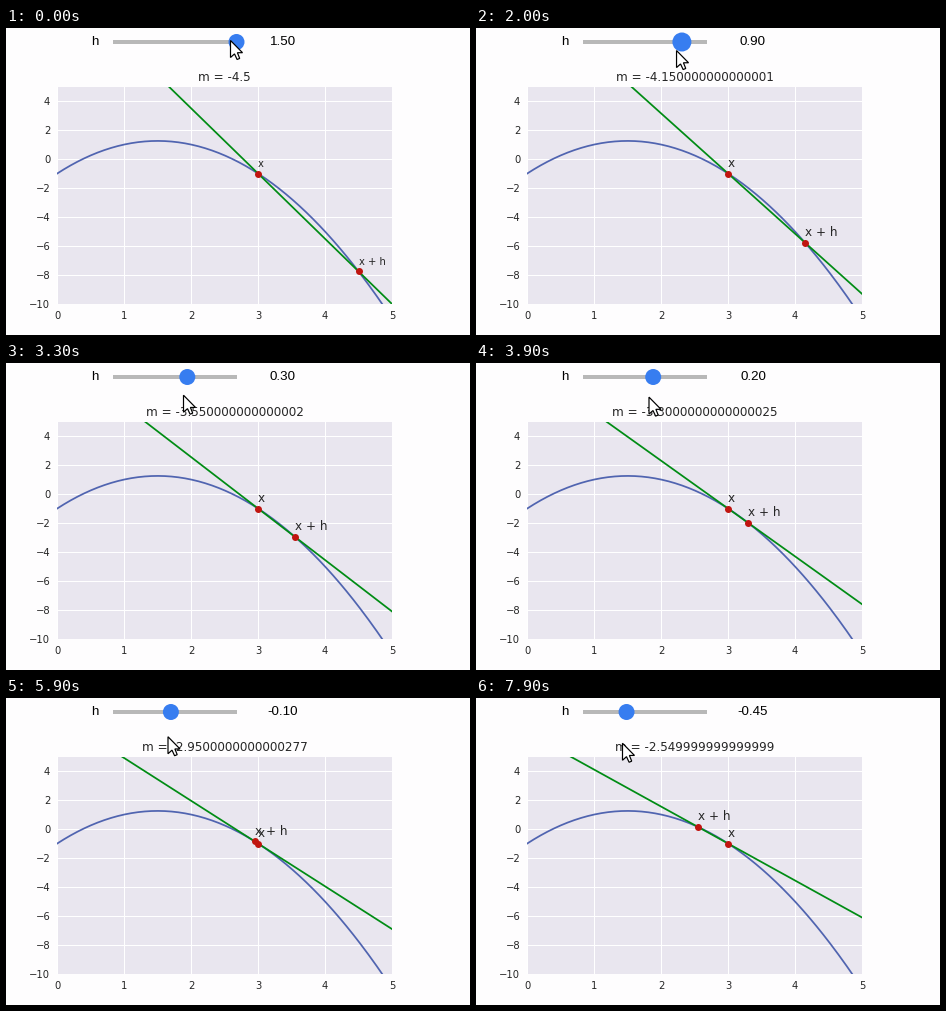
Write a matplotlib script that moves like this. It is 464 px wide and 307 px high and loops after 8 s.

```python
import math

import numpy as np
import matplotlib.pyplot as plt
from matplotlib.animation import FuncAnimation
from matplotlib.patches import Circle, Polygon

W, H, DPI = 464, 307, 64
PT = 72 / DPI  # points per pixel
FRAMES, STEP_MS = 80, 100
INK = "#262626"
X0, H_MAX = 3, 1.5

# Pointer x at a few moments of the drag; all other motion follows from it.
DRAG_FRAME = [7, 13, 26, 33, 45, 49, 59, 79]
DRAG_X = [225, 218, 186.5, 178, 169, 164.2, 162.5, 147]
ARROW = np.array([(0, 0), (0, 17), (4, 13.4), (6.6, 19), (9.2, 17.9),
                  (6.9, 12.2), (12, 12.2)])


def f(x):
    return -x**2 + 3 * x - 1


def pointer_x(frame):
    return float(np.interp(frame, DRAG_FRAME, DRAG_X))


def slider_value(frame):
    """Value under the pointer, in steps of 0.05."""
    raw = (pointer_x(frame) - 165.6) / 40
    return round(round(raw / 0.05) * 0.05, 2) + 0.0


def plot_delay(frame):
    """Frames by which the plot trails: it falls behind, then catches up."""
    return 7.3 * math.exp(-((frame - 32) / 13) ** 2 / 2)


fig = plt.figure(figsize=(W / DPI, H / DPI), dpi=DPI, facecolor="#fefdfe")

# Plot area
left, right, top, bottom = 51.2, 386, 58.56, 276
ax = fig.add_axes([left / W, 1 - bottom / H,
                   (right - left) / W, (bottom - top) / H])
ax.set(xlim=(0, 5), ylim=(-10, 5), facecolor="#e9e6ef",
       xticks=range(6), yticks=range(-10, 5, 2))
ax.set_axisbelow(True)
ax.grid(color="white", lw=1 * PT)
ax.tick_params(length=0, pad=7 * PT, labelsize=10 * PT, labelcolor=INK)
for spine in ax.spines.values():
    spine.set_visible(False)

xs = np.linspace(0, 5, 200)
ax.plot(xs, f(xs), color="#5064b0", lw=1.75 * PT)
secant, = ax.plot([], [], color="#008c14", lw=1.75 * PT)
dots, = ax.plot([], [], "o", color="#c01510", ms=7 * PT, mew=0)
label_x = ax.text(X0, f(X0) + 0.45, "x", color=INK)
label_xh = ax.text(0, 0, "x + h", color=INK)

# Slider, title and pointer in pixel coordinates
ui = fig.add_axes([0, 0, 1, 1])
ui.set(xlim=(0, W), ylim=(H, 0))
ui.axis("off")
sans = dict(family="Liberation Sans", size=13.33 * PT, color="black")
ui.text(85, 17, "h", **sans)
value = ui.text(277, 17, "", ha="center", **sans)
ui.plot([107, 231], [14, 14], color="#b8b8b8", lw=4 * PT,
        solid_capstyle="butt")
knob = ui.add_patch(Circle((0, 0), 8, fc="#377df0", lw=0, zorder=3))
title = ui.text((left + right) / 2, 53, "", ha="center", color=INK,
                size=12 * PT)
pointer = ui.add_patch(Polygon(ARROW, fc="white", ec="black", lw=1.2 * PT,
                               joinstyle="miter", zorder=5))


def update(frame):
    v = slider_value(frame)
    value.set_text(f"{v:.2f}")
    knob.center = (230.5 - 41 * (H_MAX - v), 14)
    knob.radius = 9.5 if 7 <= frame < 28 else 8

    px = pointer_x(frame)
    pointer.set_xy(ARROW + (px - 0.5, 12.5 + 0.42 * (DRAG_X[0] - px)))

    h = slider_value(frame - plot_delay(frame))
    x1 = X0 + h
    m = (f(x1) - f(X0)) / (x1 - X0) if h else math.nan
    title.set_text(f"m = {m}")
    secant.set_data([0, 5], [f(X0) + m * (x - X0) for x in (0, 5)])
    dots.set_data([X0, x1], [f(X0), f(x1)])
    label_xh.set_position((x1, f(x1) + 0.45))
    for label in (label_x, label_xh):
        label.set_fontsize((10 if h == H_MAX else 12) * PT)
    return []


anim = FuncAnimation(fig, update, frames=FRAMES, interval=STEP_MS,
                     repeat=True, repeat_delay=0)
plt.show()
```
